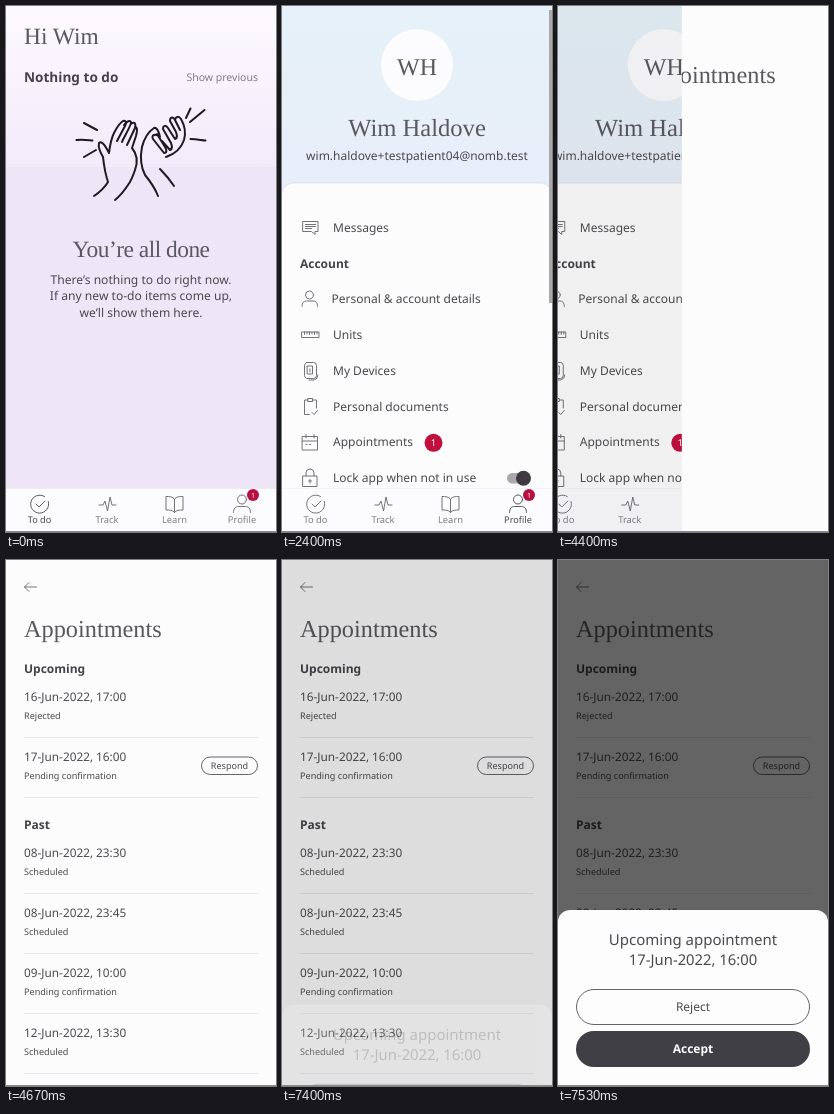
Write an HTML page that moves like this. It is 270 px wide and 526 px high and loops after 8000 ms.

```html
<!DOCTYPE html>
<html lang="en">
<head>
<meta charset="utf-8">
<title>Appointments</title>
<style>
  html, body { margin: 0; width: 100%; height: 100%; overflow: hidden; background: #fcfcfc; }
  svg { display: block; width: 100vw; height: 100vh; }
  text { font-family: "Noto Sans", sans-serif; fill: #4b494f; text-rendering: geometricPrecision; }
  .title { font-family: "Liberation Serif", serif; fill: #5a585f; }
  .bold { font-weight: 600; fill: #454349; }
  .medium { font-weight: 500; }
  .mid { text-anchor: middle; }
  .end { text-anchor: end; }
  .soft { fill: #817d86; }
  .white { fill: #fff; }
  .icon { fill: none; stroke: #6d6a72; stroke-width: .95; stroke-linecap: round; stroke-linejoin: round; }
  .ink { fill: none; stroke: #1d1a20; stroke-width: 2; stroke-linecap: round; stroke-linejoin: round; }
</style>
</head>
<body>
<svg id="stage" viewBox="0 0 270 526" preserveAspectRatio="none"></svg>
<script>
const DURATION = 8000, FRAME = 1000 / 15;
const W = 270, H = 526;

const text = (x, y, size, str, cls = '', extra = '') =>
  `<text x="${x}" y="${y}" font-size="${size}" class="${cls}" ${extra}>${str}</text>`;
const rect = (x, y, w, h, fill, extra = '') =>
  `<rect x="${x}" y="${y}" width="${w}" height="${h}" fill="${fill}" ${extra}/>`;
const circle = (x, y, r, fill) => `<circle cx="${x}" cy="${y}" r="${r}" fill="${fill}"/>`;
const path = (d, cls = 'icon', extra = '') => `<path d="${d}" class="${cls}" ${extra}/>`;
const group = (id, body, extra = '') => `<g id="${id}" ${extra}>${body}</g>`;
const gradient = (id, y2, a, b) =>
  `<linearGradient id="${id}" gradientUnits="userSpaceOnUse" x1="0" y1="0" x2="0" y2="${y2}">
    <stop stop-color="${a}"/><stop offset="1" stop-color="${b}"/></linearGradient>`;

const tabs = [
  ['To do', 33.5, 'M42.300 495.500A9 9 0 1 1 38.500 490.500M30 498l3 3 6-6'],
  ['Track', 101, 'M93 499h4l2-4 2.500 10 2.500-14 2 8h4'],
  ['Learn', 168.5, 'M168.500 493c-2-2.500-5-2.500-8.500-2.500v13.500c3.500 0 6.500 0 8.500 2.500c2-2.500 5-2.500 8.500-2.500v-13.500c-3.500 0-6.500 0-8.500 2.500v13.500'],
  ['Profile', 236, 'M240.500 493.500a4.500 4.500 0 1 1-9 0a4.500 4.500 0 1 1 9 0M227.500 506.500c0-4 2-6 5-6h7c3 0 5 2 5 6']
];

function tabBar(active) {
  return rect(0, 483, W, 43, '#fcfbfd') + rect(0, 482.5, W, .5, '#eeebf0') +
    tabs.map(([name, x, d], i) => {
      const on = i === active;
      return path(d, 'icon', on ? 'style="stroke:#504e55"' : '') +
        text(x, 517, on ? 9.2 : 9.4, name, 'mid ' + (on ? 'medium' : 'soft'));
    }).join('') +
    circle(247, 489, 6, '#b80f43') + text(247, 491.6, 7, '1', 'mid white');
}

function hands() {
  const sparks = 'M78 117l13 7M70.500 134c6-1 11 0 16 .5M78 151l12-7' +
    'M180 112l4.500-9.500M184 116l14.500-12M184.500 133c6 0 10 1 15 1.500';
  const left = 'M88 190c6-4 11-9 14-14c-3-9-4-16-5-25c-3-5-5-10-4-14c3-3 7 4 10 10' +
    'c1-8 2-14 5-20c3-6 6-10 9-12c3-1 4 2 2 5l-8 15' +
    'M118 119c3-4 6-5 7-3s-8 17-9 20M125 118c4-3 5 0 4 4l-8 17' +
    'M129 121c3 0 2 5 1 9l-4 12c5 6 6 14 3 22c-2 6-4 11-7 15c-4 6-8 11-13 15';
  const right = 'M152 190c-3-8-8-15-13-21c-4-8-5-18-3-28c2-8 6-15 12-19' +
    'c3-1 5 4 6 9c-5-4-9-2-7 2l11 14c3 0 3-3 1-6l-8-13' +
    'M156 135l8 9c3-1 2-4 1-7l-8-14c0-4 3-4 5-1l7 11c3-1 2-4 1-7l-6-11' +
    'c0-4 3-5 5-1l5 10M169 114c1-4 4-4 6-1c4 7 5 14 3 21c-3 9-9 14-18 17' +
    'M154 163c5 5 10 11 14 17';
  return path(sparks, 'ink') + path(left, 'ink') + path(right, 'ink');
}

const home =
  rect(0, 0, W, H, '#eee6f6') + rect(0, 0, W, 161, 'url(#lilac)') +
  text(18, 38, 23.4, 'Hi Wim', 'title') +
  text(18, 76, 13.6, 'Nothing to do', 'bold') +
  text(252, 75, 10.5, 'Show previous', 'end soft') +
  hands() +
  text(135, 250.5, 23.4, 'You’re all done', 'title mid', 'letter-spacing="-.5"') +
  ['There’s nothing to do right now.', 'If any new to-do items come up,', 'we’ll show them here.']
    .map((s, i) => text(135, 278 + i * 16.4, 12.1, s, 'mid')).join('') +
  tabBar(0);

const menu = [
  ['Messages', 226, 'M21 215.500h15v10h-3v3l-3.500-3h-8.500zM23.500 218.500h10M23.500 220.500h10M23.500 222.500h6'],
  ['Personal &amp; account details', 297, 'M31.500 289a4 4 0 1 1-8 0a4 4 0 1 1 8 0M20 300.500c0-4 2-5.500 4.500-5.500h6.500c3 0 4.500 1.500 4.500 5.500'],
  ['Units', 333, 'M20 326h17v5.500h-17zM22.500 326v2.500M25 326v2M27.500 326v2.500M30 326v2M32.500 326v2.500M35 326v2'],
  ['My Devices', 369, 'M24.500 356.500h7q3 0 3 3v10q0 3-3 3h-7q-2-1-2-3v-10q0-2 2-3M25.500 360h5v8h-5zM27 374h5q4-1 4-5M28 363v3'],
  ['Personal documents', 405, 'M26 394h-3.500v14.500h5M31 394h3.500v8M26 392.500h4.500v3h-4.500zM30 406.500l2 2l3.500-4'],
  ['Appointments', 440, 'M20.500 430.500h15v13.500h-15zM20.500 435h15M24 428.500v3.500M32 428.500v3.500M24 438.500h1M27.500 438.500h1'],
  ['Lock app when not in use', 476, 'M21 470h14v10.500h-14zM24 470v-3a4 4 0 0 1 8 0v3M28 473.500v3.500M26.500 475h3']
];

const profile =
  rect(0, 0, W, H, 'url(#sky)') +
  circle(135, 59, 36, '#fcfbfd') +
  text(135, 69, 24, 'WH', 'title mid') +
  text(135, 130, 24.6, 'Wim Haldove', 'title mid') +
  text(135, 154, 12, 'wim.haldove+testpatient04@nomb.test', 'mid') +
  rect(0, 176, W, 360, '#dfe0ec', 'rx="12" opacity=".6"') +
  rect(0, 177.5, W, 360, '#fcfcfc', 'rx="12"') +
  text(18, 262, 12, 'Account', 'bold') +
  menu.map(([name, y, d], i) => path(d) + text(i === 1 ? 49.5 : 51, y, 12, name)).join('') +
  circle(151.5, 436.8, 9, '#c10f3e') + text(151.5, 440.2, 9.5, '1', 'mid white') +
  rect(225, 467, 22, 10.5, '#aaa8ac', 'rx="5.2"') + circle(241.5, 472.3, 7.5, '#3d3b41') +
  tabBar(3) +
  rect(267, 4, 3, 293, '#a9a9ab', 'id="bar"');

const visits = [
  [141, '16-Jun-2022, 17:00', 'Rejected'],
  [201, '17-Jun-2022, 16:00', 'Pending confirmation'],
  [297, '08-Jun-2022, 23:30', 'Scheduled'],
  [357, '08-Jun-2022, 23:45', 'Scheduled'],
  [417, '09-Jun-2022, 10:00', 'Pending confirmation'],
  [477, '12-Jun-2022, 13:30', 'Scheduled']
];

const list =
  text(18, 113, 12, 'Upcoming', 'bold') + text(18, 269, 12, 'Past', 'bold') +
  visits.map(([y, date, state]) =>
    text(18, y, 11.8, date) + text(18, y + 18, 9.1, state, 'medium') +
    rect(18, y + 36, 234, 1, '#e8e7e9')).join('') +
  rect(195.5, 197, 56, 17.5, 'none', 'rx="8.75" stroke="#65636a"') +
  text(223.5, 209, 9.1, 'Respond', 'mid medium');

const appointments =
  rect(0, 0, W, H, '#fcfcfc') +
  path('M30.500 27h-12M23 22.500l-4.500 4.500l4.500 4.500') +
  text(18, 77, 24.3, 'Appointments', 'title') +
  group('list', list);

const sheet =
  rect(0, 350, W, 200, '#fdfdfd', 'rx="12"') +
  text(135, 385, 15, 'Upcoming appointment', 'mid') +
  text(135, 405, 14.8, '17-Jun-2022, 16:00', 'mid') +
  rect(18.5, 429.5, 233, 35, 'none', 'rx="17.5" stroke="#65636a"') +
  text(135, 451, 12, 'Reject', 'mid') +
  rect(18, 471, 234, 36, '#403f46', 'rx="18"') +
  text(135, 493, 12, 'Accept', 'mid bold white');

document.getElementById('stage').innerHTML =
  `<defs>${gradient('lilac', 161, '#fdfaff', '#f3eafa')}${gradient('sky', 178, '#e6f1f9', '#e8eef9')}
    <clipPath id="page"><rect width="${W}" height="${H}"/></clipPath></defs>` +
  group('home', home) +
  group('profile', profile) +
  rect(0, 0, W, H, '#000', 'id="shade"') +
  group('next', group('inner', appointments), 'clip-path="url(#page)"') +
  rect(0, 0, W, H, '#000', 'id="scrim"') +
  group('sheet', sheet) +
  rect(0, 525, W, 1, '#8b898d');

const el = {};
for (const id of ['home', 'profile', 'bar', 'shade', 'next', 'inner', 'list', 'scrim', 'sheet'])
  el[id] = document.getElementById(id);

const progress = (t, from, to) => Math.min(1, Math.max(0, (t - from) / (to - from)));
const easeInOut = p => .5 - .5 * Math.cos(Math.PI * p);
const shift = (node, x, y = 0) => node.setAttribute('transform', `translate(${x} ${y})`);
const fade = (node, o) => {
  node.style.display = o > 0 ? '' : 'none';
  node.style.opacity = o;
};

function render(time) {
  // The motion is sampled at 15 steps per second.
  const t = Math.floor((time % DURATION + 4) / FRAME) * FRAME;

  fade(el.profile, easeInOut(progress(t, 1880, 2280)));
  fade(el.bar, 1 - progress(t, 3610, 3860));

  const push = easeInOut(progress(t, 4150, 4625));
  const edge = W * (1 - push);
  shift(el.profile, -.2 * W * push);
  fade(el.shade, .09 * push);
  fade(el.next, push > 0 ? 1 : 0);
  shift(el.next, edge);
  shift(el.inner, -edge / 2);
  fade(el.list, t >= 4590 ? 1 : 0);

  const rise = Math.pow(progress(t, 7266, 7530), 2.3);
  fade(el.scrim, .6 * rise);
  fade(el.sheet, rise);
  shift(el.sheet, 0, 120 * (1 - rise));
}

const start = performance.now();
function tick() {
  render(performance.now() - start);
  requestAnimationFrame(tick);
}
tick();
</script>
</body>
</html>
```
